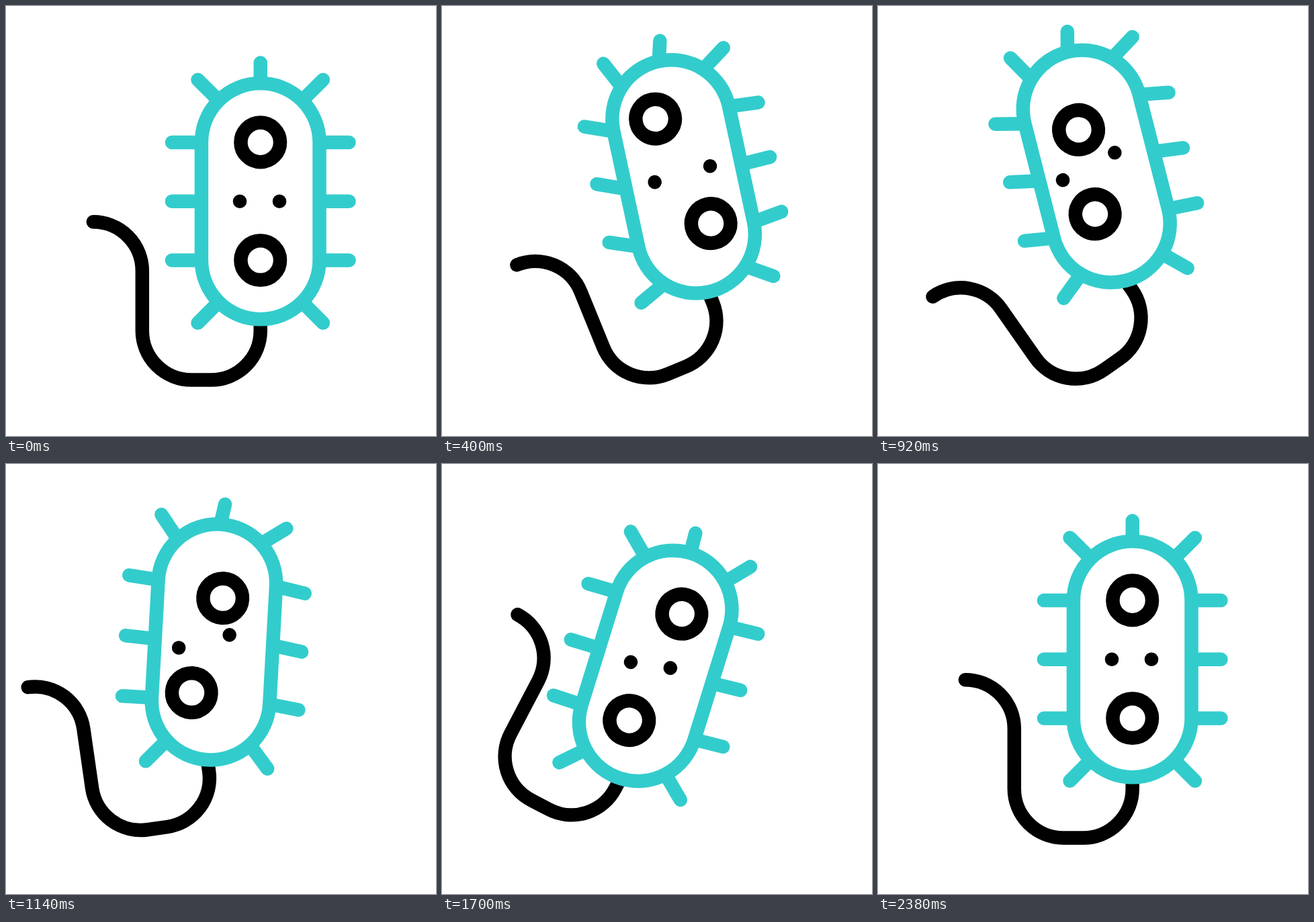
These frames come from a looping animation (640 px wide and 640 px high, 2.4 s). An HTML page with a canvas:

```html
<!DOCTYPE html>
<html>
<head>
<meta charset="utf-8">
<style>
  html, body { margin: 0; height: 100%; overflow: hidden; background: #fff; }
  canvas { display: block; width: 100vmin; height: 100vmin; }
</style>
</head>
<body>
<canvas width="640" height="640"></canvas>
<script>
const ctx = document.querySelector('canvas').getContext('2d');
const LOOP = 2400, TEAL = '#33cccc', RAD = Math.PI / 180;
const CX = 378.7, CY = 290.7, R = 87.8;

// Waypoints are [time, x, y]
const REST = [0, 0, 0];
const drift = [REST, [400, -19, -36.7], [540, -33.5, -57.7], [720, -44, -70],
  [920, -53.4, -52.2], [1380, -81.1, 0], [1700, -61.1, 9.6], [2300, 0, 0]];

// Floating parts: rest position, radius and offsets on the way round
const part = (x, y, r, a, b, c) =>
  ({ x, y, r, way: [REST, [400, ...a], [920, ...b], [1380, ...c], [2000, 0, 0]] });
const nuclei = [
  part(0, -R, 29.3, [-23, -5], [-12.5, 28.5], [29, 9.5]),
  part(0, R, 29.3, [25, -11], [-19.5, -19.5], [-30.5, 0])
];
const dots = [
  part(-30.7, 0, 10.3, [-13, -1], [-23, 7.5], [-16, 13]),
  part(28.3, 0, 10.3, [13.5, -7], [3, -13], [-12.5, -9])
];
const tail = new Path2D('M0 0v17a73.2 73.2 0 0 1-73.2 73.2h-29.5a73.2 73.2 0 0 1-73.2-73.2v-89a73 73 0 0 0-73-73');

const smooth = u => u * u * (3 - 2 * u);

// Position on a smooth curve through waypoints, at rest at both ends
function travel(t, points) {
  const last = points.length - 1;
  if (t >= points[last][0]) return [0, 0];
  let i = 0;
  while (t >= points[i + 1][0]) i++;
  const p = points[i], q = points[i + 1], span = q[0] - p[0], u = (t - p[0]) / span;
  const slope = (k, axis) => k % last === 0 ? 0
    : (points[k + 1][axis] - points[k - 1][axis]) / (points[k + 1][0] - points[k - 1][0]);
  return [1, 2].map(axis => p[axis] + (q[axis] - p[axis]) * smooth(u)
    + span * u * (1 - u) * (slope(i, axis) * (1 - u) - slope(i + 1, axis) * u));
}

// Angle that eases from 0 to a, to b and back to 0
function sway(t, [t1, a], [t2, b], end) {
  if (t < t1) return a * smooth(t / t1) * RAD;
  if (t < t2) return (a + (b - a) * smooth((t - t1) / (t2 - t1))) * RAD;
  return b * (1 - smooth(Math.min(1, (t - t2) / (end - t2)))) * RAD;
}

// Fading wave that runs from spike to spike, faster and faster
function spikeSwing(t, i) {
  const size = 36.3 * (1 - t / LOOP) ** 1.9 * (1 - Math.exp(-((t / 293) ** 2)));
  const crest = 2.1 + 2.8 * (t / 1000) ** 3.3;
  return size * Math.cos((i - crest) * 16.5 * RAD);
}

// Eleven spikes from bottom left over the top to bottom right
function drawSpikes(t) {
  ctx.beginPath();
  for (let i = 0; i < 11; i++) {
    const k = Math.abs(i - 5), turn = k < 2 ? k : k < 5 ? 2 : 3;
    const direction = 45 * turn * Math.sign(i - 5) - 90;
    const x = R * Math.cos(direction * RAD);
    const y = R * (Math.max(-1, Math.min(1, k - 3)) + Math.sin(direction * RAD));
    const length = k ? 44 : 30.5, a = (direction + spikeSwing(t, i)) * RAD;
    ctx.moveTo(x, y);
    ctx.lineTo(x + length * Math.cos(a), y + length * Math.sin(a));
  }
  ctx.stroke();
}

function circle({ x, y, r, way }, t) {
  const [dx, dy] = travel(t, way);
  ctx.beginPath();
  ctx.arc(x + dx, y + dy, r, 0, 2 * Math.PI);
}

function draw(t) {
  ctx.clearRect(0, 0, 640, 640);
  ctx.save();
  ctx.lineWidth = 20.5;
  ctx.lineCap = 'round';
  const [dx, dy] = travel(t, drift);
  ctx.translate(CX + dx, CY + dy);
  ctx.rotate(sway(t, [730, -21.15], [1480, 21.4], 2260));

  ctx.save();
  ctx.translate(0, 2 * R);
  ctx.rotate(sway(t, [840, -21.6], [1640, 10.6], LOOP));
  ctx.strokeStyle = '#000';
  ctx.stroke(tail);
  ctx.restore();

  ctx.strokeStyle = TEAL;
  drawSpikes(t);
  ctx.beginPath();
  ctx.arc(0, -R, R, Math.PI, 0);
  ctx.arc(0, R, R, 0, Math.PI);
  ctx.closePath();
  ctx.fillStyle = '#fff';
  ctx.fill();
  ctx.stroke();

  ctx.strokeStyle = ctx.fillStyle = '#000';
  for (const n of nuclei) { circle(n, t); ctx.stroke(); }
  for (const d of dots) { circle(d, t); ctx.fill(); }
  ctx.restore();
}

function tick() {
  draw(performance.now() % LOOP);
  requestAnimationFrame(tick);
}
tick();
</script>
</body>
</html>
```
